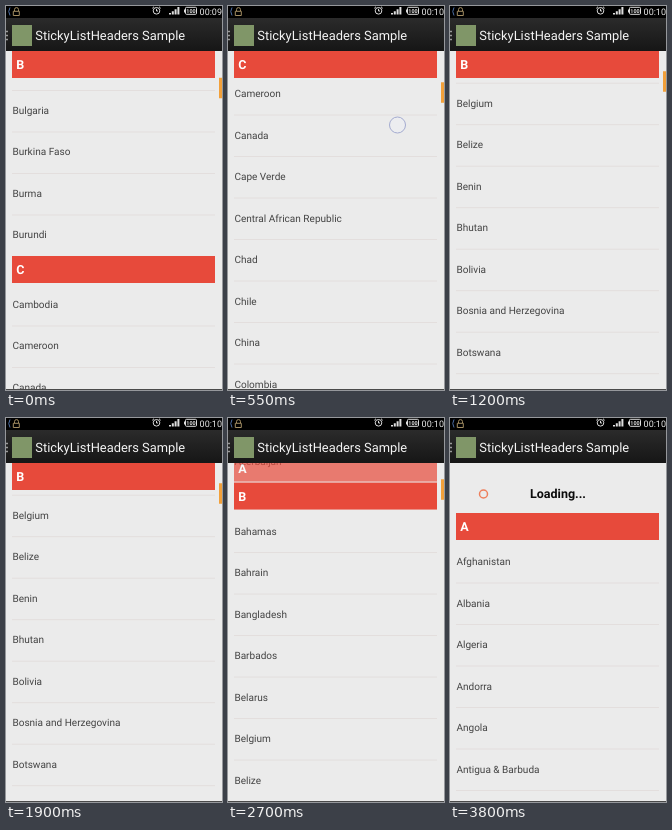
These frames come from a looping animation (216 px wide and 384 px high, 3.85 s). An HTML page:

```html
<!DOCTYPE html>
<html lang="en">
<head>
<meta charset="utf-8">
<title>Sticky list headers</title>
<style>
  html, body { margin: 0; width: 100%; height: 100%; overflow: hidden; background: #ebebeb; }
  svg { display: block; width: 100vw; height: 100vh; }
  text { font-family: Roboto, "Noto Sans", sans-serif; text-rendering: geometricPrecision; }
  .row { font-size: 10.05px; fill: #444; }
  .head { font-size: 12.5px; font-weight: 700; fill: #fff; }
  .label { font-size: 12.5px; font-weight: 700; fill: #0c0c0c; text-anchor: middle; }
</style>
</head>
<body>
<svg viewBox="0 0 216 384">
  <defs>
    <linearGradient id="bar" x1="0" y1="0" x2="0" y2="1">
      <stop offset="0" stop-color="#2b2b2b"/>
      <stop offset="1" stop-color="#161616"/>
    </linearGradient>
    <clipPath id="view"><rect y="45" width="216" height="339"/></clipPath>
  </defs>
  <rect width="216" height="384" fill="#ebebeb"/>

  <g clip-path="url(#view)">
    <g id="rows"></g>
    <g id="heads"></g>
    <g id="pull">
      <g id="arrow">
        <path d="M0-13.5L5.5-5H2.8V0H-2.8V-5H-5.5Z" fill="#151515"/>
        <path d="M-2.8 1.6H2.8" stroke="#2e3436" stroke-width="2"/>
        <path d="M-2.8 4.6H2.8" stroke="#4b5354" stroke-width="2"/>
        <path d="M-2.8 7.6H2.8" stroke="#6c7473" stroke-width="2"/>
        <path d="M-2.8 10.6H2.8" stroke="#949a99" stroke-width="2"/>
        <path d="M-2.8 13.2H2.8" stroke="#b9bdbc" stroke-width="1.4"/>
      </g>
      <circle id="spin" cx="33.5" r="4" fill="none" stroke="#ee7f5c" stroke-width="1.5"/>
      <text id="label" class="label" x="108" y="4.4"></text>
    </g>
    <rect id="thumb" x="213" width="3" height="20.5" fill="#f2a03a"/>
    <circle id="touch" r="8" fill="#eceef4" fill-opacity=".6" stroke-width="1"/>
    <rect y="383" width="216" height="1" fill="#4a4a4a"/>
  </g>

  <rect y="12" width="216" height="33" fill="url(#bar)"/>
  <path d="M0 25.5H2M0 29.5H2M0 33.5H2" stroke="#9a9a9a" stroke-width="1.4"/>
  <rect x="6" y="19" width="20" height="21" fill="#809668"/>
  <text x="29.3" y="34" font-size="12.9" fill="#f4f4f4">StickyListHeaders Sample</text>

  <rect width="216" height="12" fill="#000"/>
  <path d="M4 1.5Q1.5 5.5 4 9.5" fill="none" stroke="#4d6fa5" stroke-width="1"/>
  <path d="M8.5 5V3.6a2 2 0 0 1 4 0V5M7.3 5.3H13.3V9.5H7.3Z" fill="none" stroke="#a28d62" stroke-width="1"/>
  <g fill="none" stroke="#dedede" stroke-width="1">
    <circle cx="150.5" cy="4.8" r="3.3"/>
    <path d="M150.5 2.8V5H152M146.3 2.3L148 .7M153 .7L154.7 2.3"/>
    <rect x="179.5" y="1.3" width="11" height="7" rx="1"/>
    <path d="M178.5 3.5V6.5"/>
  </g>
  <path d="M163 8.5V7h2V8.5zM165.8 8.5V5.3h2V8.5zM168.6 8.5V3.3h2V8.5zM171.4 8.5V1h2V8.5z" fill="#dedede"/>
  <text x="185" y="6.9" font-size="5.4" font-weight="700" fill="#e4e4e4" text-anchor="middle">100</text>
  <text id="clock" x="216" y="8.7" font-size="9" fill="#e8e8e8" text-anchor="end"></text>
</svg>
<script>
const LOOP = 3850, TOP = 45, ROW = 41.5, HEAD = 28;
const NS = "http://www.w3.org/2000/svg";
const $ = id => document.getElementById(id);

const sections = [
  ["A", "Afghanistan,Albania,Algeria,Andorra,Angola,Antigua & Barbuda,Argentina,Armenia,Australia,Austria,Azerbaijan"],
  ["B", "Bahamas,Bahrain,Bangladesh,Barbados,Belarus,Belgium,Belize,Benin,Bhutan,Bolivia,Bosnia and Herzegovina,Botswana,Brazil,Brunei,Bulgaria,Burkina Faso,Burma,Burundi"],
  ["C", "Cambodia,Cameroon,Canada,Cape Verde,Central African Republic,Chad,Chile,China,Colombia,Comoros,Congo"]
];

const linear = p => p;
const easeIn = p => p * p;
const easeOut = p => Math.sin(p * Math.PI / 2);
const easeInOut = p => (1 - Math.cos(p * Math.PI)) / 2;
const clamp = v => Math.min(1, Math.max(0, v));

// Scroll offset at each time, with the easing that leads up to it
const scrollKeys = [
  [0, 1054.5],
  [550, 1307, easeInOut],
  [1150, 688.3, easeInOut],
  [2220, 688.3, linear],
  [2700, 466.5, easeIn],
  [3000, 0, linear],
  [3300, -83, easeOut],
  [3350, -83.5, linear],
  [3700, -50, easeOut],
  [LOOP, -50, linear]
];
const RELEASE = 3350, TURN = 3130, TURN_TIME = 250;

function scrollAt(t) {
  const i = scrollKeys.findIndex((k, n) => n > 0 && t <= k[0]);
  const [t0, a] = scrollKeys[i - 1], [t1, b, ease] = scrollKeys[i];
  return a + (b - a) * ease((t - t0) / (t1 - t0));
}

function add(parent, tag, attrs, text) {
  const el = document.createElementNS(NS, tag);
  for (const k in attrs) el.setAttribute(k, attrs[k]);
  if (text) el.textContent = text;
  parent.appendChild(el);
  return el;
}

const heads = [];
let y = 0;
for (const [letter, names] of sections) {
  const g = add($("heads"), "g", {});
  add(g, "rect", { x: 6, width: 203, height: 27, fill: "#e74a3b" });
  add(g, "text", { x: 10.2, y: 18, class: "head" }, letter);
  heads.push({ g, top: y });
  y += HEAD;
  names.split(",").forEach((name, i) => {
    if (i) add($("rows"), "rect", { x: 6, y, width: 203, height: 1, fill: "#e3dedd" });
    add($("rows"), "text", { x: 6.4, y: y + 24, class: "row" }, name);
    y += ROW;
  });
}

function move(el, x, y, extra = "") {
  el.setAttribute("transform", `translate(${x} ${y}) ${extra}`);
}
function show(el, on) {
  el.setAttribute("visibility", on ? "visible" : "hidden");
}

// A stuck header fades as the next one pushes it out
function drawHeads(s) {
  heads.forEach((h, i) => {
    const next = i + 1 < heads.length ? heads[i + 1].top - HEAD : Infinity;
    const offset = Math.min(Math.max(h.top - s, 0), next - s);
    move(h.g, 0, TOP + offset);
    h.g.setAttribute("opacity", clamp(1 + offset / HEAD));
  });
}

function drawTouch(t, s) {
  const scrolling = t > 40 && t < 850;
  const pulling = t > 3000 && t < RELEASE;
  show($("touch"), scrolling || pulling);
  $("touch").setAttribute("stroke", pulling ? "#cfcaca" : "#a4abd0");
  if (scrolling) move($("touch"), 169.5, 1426 - s);
  if (pulling) move($("touch"), 134.5, 278 - 2 * (s + 83));
}

function drawPull(t, s) {
  const loading = t >= RELEASE;
  show($("pull"), s < 0);
  show($("arrow"), s < 0 && !loading);
  show($("spin"), s < 0 && loading);
  move($("pull"), 0, TOP + 31 + .75 * (-s - 50));
  const turn = clamp((t - TURN) / TURN_TIME);
  move($("arrow"), 35, .5, `rotate(${180 * (1 - turn)})`);
  $("label").textContent = loading ? "Loading..." : t >= TURN ? "Release to refresh..." : "Pull to refresh...";
}

function draw(t) {
  const s = scrollAt(t);
  move($("rows"), 0, TOP - s);
  drawHeads(s);
  drawPull(t, s);
  drawTouch(t, s);
  $("thumb").setAttribute("y", 53 + s * (s < 0 ? .06 : .0178));
  $("thumb").setAttribute("opacity", clamp((3750 - t) / 250));
  $("clock").textContent = t < 300 ? "00:09" : "00:10";
}

const start = performance.now();
function tick() {
  draw((performance.now() - start) % LOOP);
  requestAnimationFrame(tick);
}
draw(0);
tick();
</script>
</body>
</html>
```
